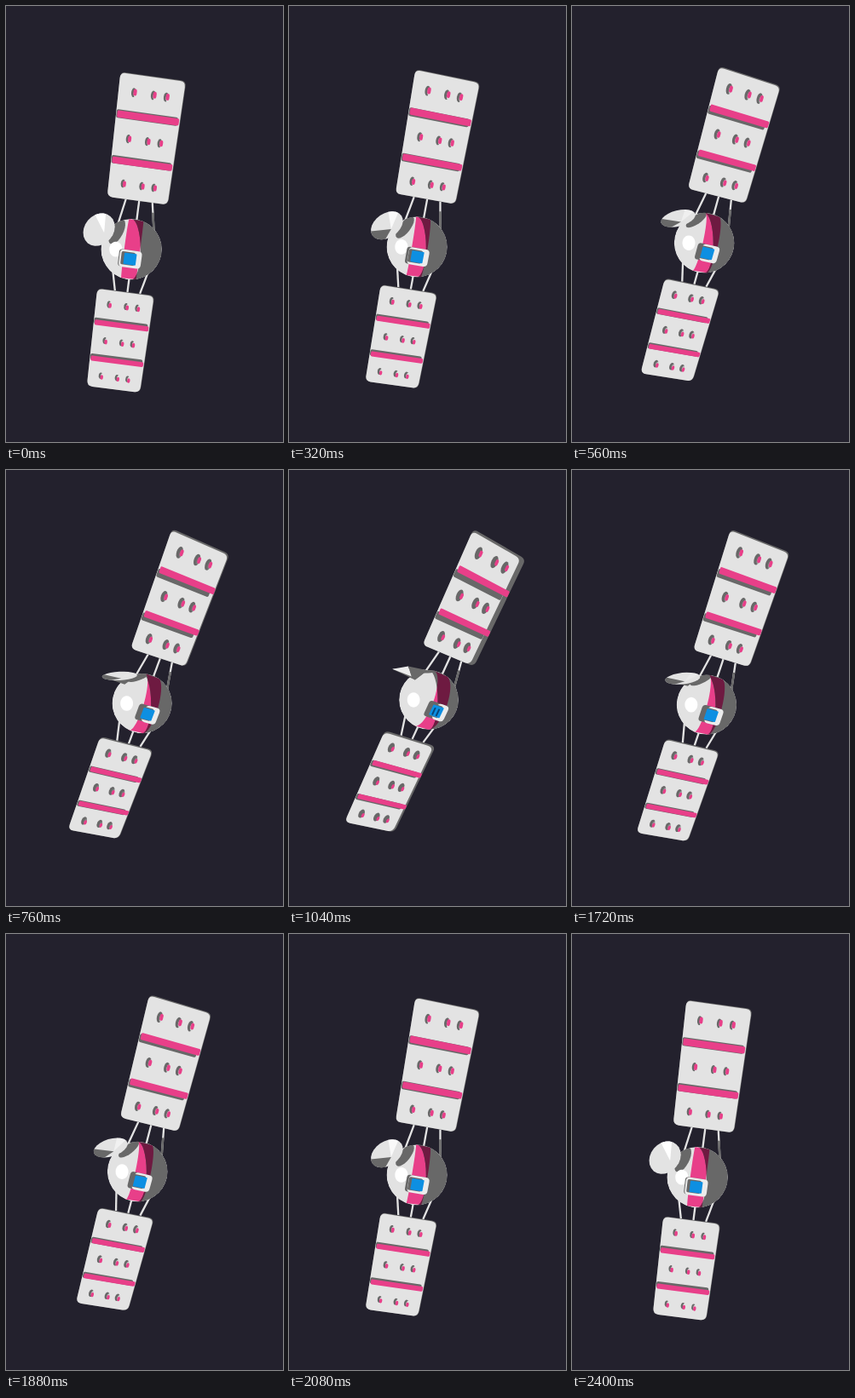
Write an HTML page that moves like this. It is 325x512 px and loops after 2.44 s.

```html
<!DOCTYPE html>
<html lang="en">
<head>
<meta charset="utf-8">
<title>Satellite</title>
<style>
html, body { margin: 0; width: 100%; height: 100%; overflow: hidden; background: #23212d; }
svg { position: fixed; left: 0; top: 0; width: 100%; height: 100%; }
</style>
</head>
<body>
<svg viewBox="0 0 325 512">
  <defs>
    <clipPath id="ball"><circle r="40"/></clipPath>
    <clipPath id="night"><path d="M0-40A12 40 0 0 1 0 40A40 40 0 0 0 0-40Z"/></clipPath>
  </defs>
  <g id="back"></g>
  <g id="globe">
    <g clip-path="url(#ball)">
      <circle r="40" fill="#e2e2e2"/>
      <g id="day"></g>
      <g clip-path="url(#night)">
        <circle r="40" fill="#686868"/>
        <g id="dark"></g>
      </g>
    </g>
    <g id="hatch"></g>
  </g>
  <g id="front"></g>
</svg>
<script>
const LOOP = 2440, STEP = 40, SWING = 2400;
const LIGHT = '#e3e3e3', GREY = '#686868', PINK = '#e83f89', WINE = '#6e1a41', BLUE = '#0d8fe2';
const FOCAL = 400, WIDTH = 78, LENGTH = 427.5, RADIUS = 40;
const AXIS = [0.207, -0.798, 0.565], TURN = 23.4 * Math.PI / 180;
const RIGHT = [0.9907, 0.1346, 0.016], DOWN = [-0.1296, 0.967, 0.2198];

const layers = {};
for (const id of ['back', 'day', 'dark', 'hatch', 'front'])
  layers[id] = { node: document.getElementById(id), n: 0 };
const globe = document.getElementById('globe');

let e = 0, origin, axes, hub, zoom;

const lerp = (a, b, k) => a.map((v, i) => v + (b[i] - v) * k);
const dot = (a, b) => a[0] * b[0] + a[1] * b[1] + a[2] * b[2];
const cross = (a, b) => [a[1] * b[2] - a[2] * b[1], a[2] * b[0] - a[0] * b[2], a[0] * b[1] - a[1] * b[0]];
const clamp = v => Math.max(0, Math.min(1, v));

function spin(v, angle) {
  const c = Math.cos(angle), s = Math.sin(angle), k = dot(AXIS, v) * (1 - c), w = cross(AXIS, v);
  return v.map((x, i) => x * c + w[i] * s + AXIS[i] * k);
}

// Body coordinates (right, down, away) to the stage
function project(x, y, z = 0) {
  const p = origin.map((o, i) => o + x * axes[0][i] + y * axes[1][i] + z * axes[2][i]);
  return [162.5 + FOCAL * p[0] / p[2], 256 + FOCAL * p[1] / p[2]];
}
const onGlobe = (x, y, z) => project(x, y, z).map((v, i) => (v - hub[i]) / zoom);

function draw(id, fill, d, opacity = 1) {
  const layer = layers[id];
  let el = layer.node.children[layer.n++];
  if (!el) {
    el = document.createElementNS('http://www.w3.org/2000/svg', 'path');
    layer.node.appendChild(el);
  }
  el.setAttribute('fill', fill);
  el.setAttribute('d', d);
  el.setAttribute('opacity', opacity);
}

const fmt = p => p.map(v => v.toFixed(2)).join(' ');
const poly = pts => 'M' + pts.map(fmt).join(' ') + 'Z';

function rounded(pts, r) {
  const toward = (a, b) => lerp(a, b, Math.min(0.5, r / (Math.hypot(b[0] - a[0], b[1] - a[1]) || 1)));
  return pts.map((p, i) => {
    const prev = pts[(i + pts.length - 1) % pts.length], next = pts[(i + 1) % pts.length];
    return (i ? 'L' : 'M') + fmt(toward(p, prev)) + 'Q' + fmt(p) + ' ' + fmt(toward(p, next));
  }).join('') + 'Z';
}

function arc(fn, from, to, n = 24) {
  return Array.from({ length: n + 1 }, (_, i) => fn(from + (to - from) * i / n));
}

function ellipse([cx, cy], rx, ry, deg) {
  const c = Math.cos(deg * Math.PI / 180), s = Math.sin(deg * Math.PI / 180);
  return a => {
    const x = rx * Math.cos(a * Math.PI / 180), y = ry * Math.sin(a * Math.PI / 180);
    return [cx + x * c - y * s, cy + x * s + y * c];
  };
}

function rod(color, a, b, w) {
  const len = Math.hypot(b[0] - a[0], b[1] - a[1]);
  const n = [(a[1] - b[1]) / len * w / 2, (b[0] - a[0]) / len * w / 2];
  const shift = (p, k) => [p[0] + n[0] * k, p[1] + n[1] * k];
  draw('back', color, poly([shift(a, 1), shift(b, 1), shift(b, -1), shift(a, -1)]));
}

// Panel details use u across (0..1) and y along, both from the top left corner
function panel(top, size, upper) {
  const map = (u, y, h = 0) => project((u - 0.5) * WIDTH, top + y, -h);
  const rect = (u1, y1, u2, y2, h) => [map(u1, y1, h), map(u2, y1, h), map(u2, y2, h), map(u1, y2, h)];
  const disc = (u, y, ru, ry, h) =>
    poly(arc(a => map(u + ru * Math.cos(a), y + ry * Math.sin(a), h), 0, 2 * Math.PI, 18));
  const edge = 0.008 + (upper ? 0.11 : 0.04) * e ** 8;

  draw('back', GREY, rounded(rect(0, 0, 1, size), 6.5));
  draw('back', LIGHT, rounded(rect(0, 0.8 + 2 * e * e, 1 - edge, size), 6.5));

  const drop = (upper ? 6.5 : 3.5) * e;
  for (const k of [0.319, 0.685]) {
    const y = k * size;
    draw('back', GREY, rounded(rect(0.005, y - 5.5 + drop, 0.96 - 0.05 * e, y + 4.3 + drop), 2));
    draw('back', PINK, rounded(rect(0.022, y - 4, 0.978, y + 4, 3), 1.6));
  }
  for (const k of [0.14, 0.502, 0.872])
    for (const u of [0.255, 0.555, 0.752]) {
      const y = k * size;
      draw('back', GREY, disc(u - 0.022, y, 0.036 + 0.018 * e, 5.2 + 2.4 * e));
      draw('back', LIGHT, disc(u + 0.016, y + 0.5, 0.038, 5), clamp(1.6 - 2 * e));
      draw('back', PINK, rounded(rect(u - 0.024, y - 3.8, u + 0.028, y + 3.8, 3), 2.2));
    }
}

function struts(upperEdge, lowerEdge) {
  for (const edge of [upperEdge, lowerEdge])
    for (const s of [-1, 0, 1]) {
      const a = project(2 + 17 * s, edge), b = project(2 + 24 * s, Math.sign(edge) * 28);
      rod(LIGHT, a, b, 2.3);
      if (edge < 0 && s > 0) rod(GREY, lerp(a, b, 0.35), b, 2.4);
    }
}

function stripe() {
  const side = x => {
    const r = Math.sqrt(RADIUS * RADIUS - x * x);
    return a => onGlobe(x, -r * Math.cos(a), -r * Math.sin(a));
  };
  const d = poly([...arc(side(-8), -0.25, 2.95), ...arc(side(11), 2.95, -0.25)]);
  draw('day', PINK, d);
  draw('dark', WINE, d);
}

function hatch() {
  const box = (color, r, x1, y1, x2, y2, opacity) => draw('hatch', color,
    rounded([[x1, y1], [x2, y1], [x2, y2], [x1, y2]].map(([x, y]) => onGlobe(x, y, -RADIUS)), r), opacity);
  box(GREY, 4, -13.5, -11, 10, 10.5);
  box('#ececec', 5, -12.5 + 11 * e, -11, 14, 11);
  box(GREY, 2, -10.5, -8.5, 6, 8);
  box(BLUE, 1, -7, -7.2, 7.8, 7.2);
  for (const x of [-4, 1.5]) box('#0b4678', 0.5, x, -4, x + 2.2, 6, clamp((e - 0.75) * 6));
}

function body() {
  const shade = ellipse(lerp([-19, -23], [0, -40], e), 18 - 4 * e, 8 - 5 * e, -62 * (1 - e));
  draw('day', GREY, poly(arc(shade, 0, 360)));
  draw('day', '#fff', poly(arc(ellipse([-20.5, 0], 8.5, 10, 0), 0, 360)));
  stripe();
  hatch();
}

function dish() {
  const place = (from, to) => lerp(from, to, e).map((v, i) => v + hub[i]);
  const center = place([-38, -23], [-21.4, -36]);
  const apex = place([-32, -19.5], [-15.5, -23.5]);
  const bowl = lerp(apex, center, e);
  const rim = ellipse(center, 20.6, Math.max(0.6, 17 * (1 - e)), 2 - 52 * (1 - e) ** 2);
  const left = rim(180), right = rim(0);
  const open = clamp(e * 6), late = clamp((e - 0.74) / 0.15);
  const crest = [center[0] - 2, center[1] - 4], fold = [center[0] + 2, center[1] + 8];

  draw('front', GREY, poly([left, right, apex]));
  draw('front', LIGHT, poly(arc(rim, 0, 360)));
  draw('front', GREY, poly([bowl, ...arc(rim, 150 - 30 * open, 150 + 48 * open + 15 * e)]), 1 - late);
  draw('front', '#fff', poly([bowl, ...arc(rim, -60, -20)]), clamp(1 - e * 1.3));
  // Outer cone, seen once the rim has turned past edge-on
  draw('front', '#ececec', poly([left, crest, fold]), late);
  draw('front', GREY, poly([crest, right, apex, fold]), late);
}

function render(ms) {
  const t = Math.floor(ms % LOOP / STEP) * STEP;
  e = (1 - Math.cos(2 * Math.PI * t / SWING)) / 2;
  for (const id in layers) layers[id].n = 0;

  const right = spin(RIGHT, TURN * e), down = spin(DOWN, TURN * e);
  axes = [right, down, cross(right, down)];
  origin = lerp([-17.2, 33.2, 447.5], [2.6, 15.2, 459], e);
  hub = project(0, 0);
  zoom = FOCAL / origin[2];
  globe.setAttribute('transform', `translate(${fmt(hub)}) scale(${zoom})`);

  const half = LENGTH / 2, upper = 0.348 * LENGTH, lower = 0.358 * LENGTH;
  struts(upper - half, half - lower);
  panel(-half, upper, true);
  panel(half - lower, lower, false);
  body();
  dish();
}

function tick() {
  render(performance.now());
  requestAnimationFrame(tick);
}
tick();
</script>
</body>
</html>
```
